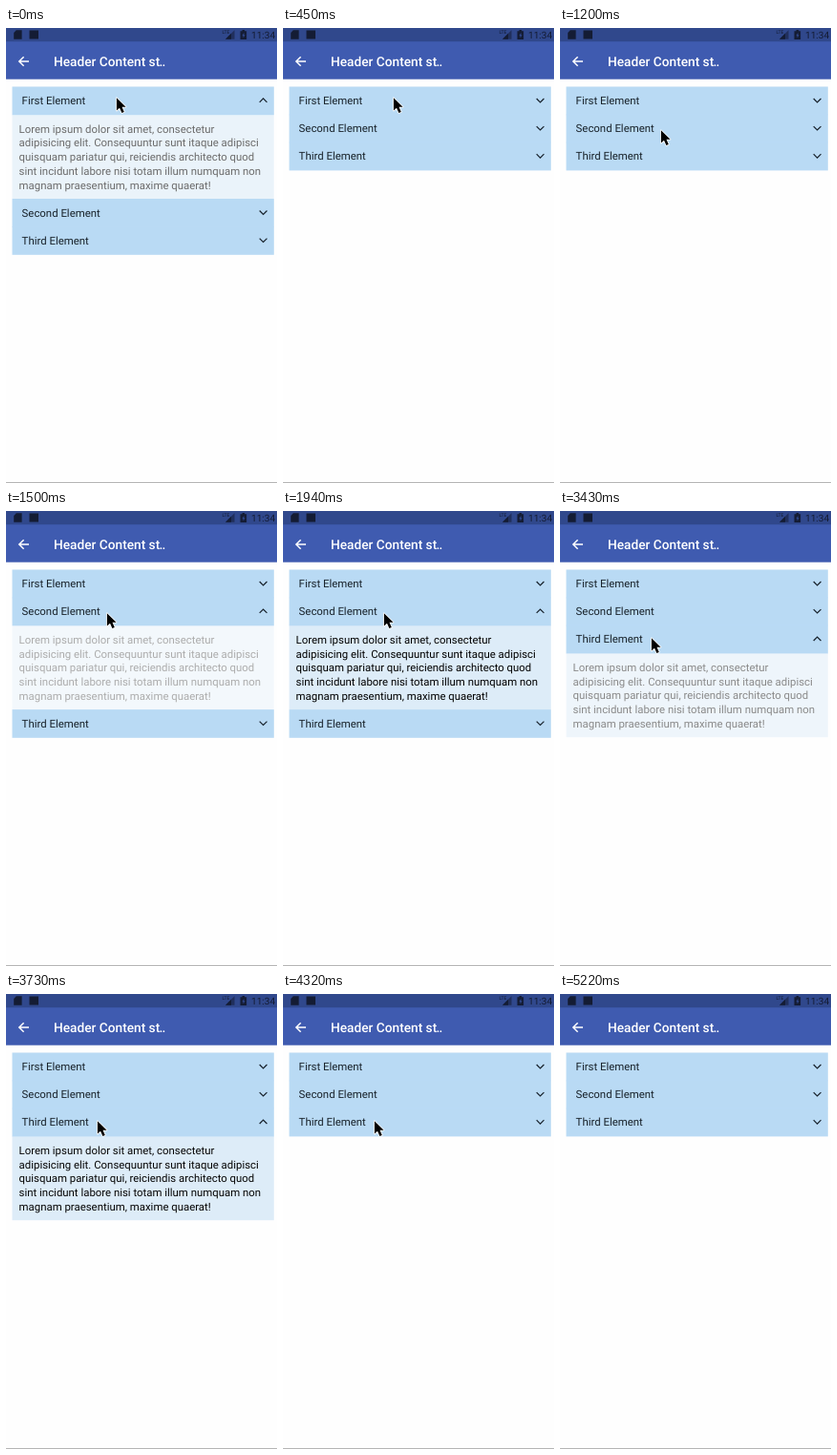
Write an HTML page that moves like this. It is 284x477 px and loops after 5970 ms.

```html
<!DOCTYPE html>
<html lang="en">
<head>
<meta charset="utf-8">
<title>Accordion</title>
<style>
  html, body { margin: 0; width: 100%; height: 100%; overflow: hidden; background: #fefefe; }
  svg { display: block; width: 284px; height: 477px; font-family: Roboto, "Open Sans", sans-serif; }
  text { text-rendering: geometricPrecision; white-space: pre; }
  .row text, .content text { font-size: 11.4px; }
  .row text { fill: #18222a; }
  .line { fill: none; }
</style>
</head>
<body>
<svg id="stage" viewBox="0 0 284 477">
  <rect width="284" height="477" fill="#fefefe"/>
  <rect y="476" width="284" height="1" fill="#b4b4b4"/>

  <rect width="284" height="53.7" fill="#3f5bb0"/>
  <rect width="284" height="14.2" fill="#30488c"/>
  <g fill="#141c34">
    <path d="M10.8 2.2H16.6V11.8H8.2V5Z"/>
    <rect x="24.5" y="2.5" width="9.5" height="9"/>
    <path d="M239.5 2.3V11.8H230Z" fill-opacity=".55"/>
    <path d="M236 5.8V11.8H230Z"/>
    <path d="M247.5 2h2.6v1.2h2V12h-6.6V3.2h2Z"/>
    <text x="226.5" y="6.4" font-size="5">LTE</text>
    <text x="257" y="10.6" font-size="10.1">11:34</text>
  </g>
  <path d="M249.4 4.8L247.4 8.2H248.6V10.6L250.6 7.2H249.4Z" fill="#30488c"/>

  <path class="line" d="M24 35H14M18.6 30.2L13.8 35L18.6 39.8" stroke="#fff" stroke-width="1.5"/>
  <g fill="#fff" font-size="13.7" font-weight="500">
    <text x="50" y="40.1">Header Content st</text>
    <text x="160.6" y="40.1" letter-spacing="-.9">..</text>
  </g>
</svg>
<script>
const LOOP = 5970, TICK = 148.9;
const TOP = 61.5, ROW = 29.1, OPEN = 88.4, LEFT = 6.5, WIDTH = 274.3;
const OVERLAP = .6; // hides seams between rows
const LINES = [
  'Lorem ipsum dolor sit amet, consectetur',
  'adipisicing elit. Consequuntur sunt itaque adipisci',
  'quisquam pariatur qui, reiciendis architecto quod',
  'sint incidunt labore nisi totam illum numquam non',
  'magnam praesentium, maxime quaerat!'
];
const ITEMS = [
  { title: 'First Element', opened: -215, closed: 440 },
  { title: 'Second Element', opened: 1440, closed: 2380 },
  { title: 'Third Element', opened: 3272, closed: 4315 }
];
const START = { x: 115, y: 72 };
const GLIDES = [
  { x: 105, y: 106, from: 738, ms: 340 },
  { x: 95, y: 132, from: 2655, ms: 222 },
  { x: 145, y: 251, from: 4630, ms: 230 },
  { x: 167, y: 253, from: 4917, ms: 140 }
];
const POINTER_GONE = 5200;

const stage = document.getElementById('stage');

function add(parent, tag, attrs, text) {
  const el = document.createElementNS('http://www.w3.org/2000/svg', tag);
  for (const name in attrs) el.setAttribute(name, attrs[name]);
  if (text) el.textContent = text;
  return parent.appendChild(el);
}

function move(el, x, y) {
  el.setAttribute('transform', `translate(${x} ${y})`);
}

function ease(x) {
  const c = Math.min(1, Math.max(0, x));
  return c * c * (3 - 2 * c);
}

for (const item of ITEMS) {
  item.content = add(stage, 'g', { class: 'content' });
  add(item.content, 'rect', { x: LEFT, width: WIDTH, height: OPEN, fill: '#ddecf8' });
  LINES.forEach((line, n) =>
    add(item.content, 'text', { x: 13.6, y: 19.2 + 14.7 * n }, line));

  item.row = add(stage, 'g', { class: 'row' });
  add(item.row, 'rect', { x: LEFT, width: WIDTH, height: ROW + OVERLAP, fill: '#b9daf4' });
  add(item.row, 'text', { x: 16.6, y: 18.8 }, item.title);
  const spot = add(item.row, 'g', { transform: 'translate(269.6 14.4)' });
  item.arrow = add(spot, 'path',
    { class: 'line', d: 'M-3.9 -1.9L0 2L3.9 -1.9', stroke: '#16202a', 'stroke-width': 1.2 });
}

const pointer = add(stage, 'path', {
  d: 'M.9 1.2V14.6L4 11.8L6.4 17L8.8 15.9L6.5 10.8H10.6Z',
  stroke: '#fff', 'stroke-width': 1.6, 'stroke-linejoin': 'round', 'paint-order': 'stroke'
});

function drawList(t) {
  let y = TOP;
  for (const { opened, closed, content, row, arrow } of ITEMS) {
    const open = t >= opened && t < closed;
    move(row, 0, y);
    arrow.setAttribute('transform', `scale(1 ${open ? -1 : 1})`);
    y += ROW;
    move(content, 0, y);
    content.setAttribute('opacity', open ? .3 + .7 * ease((t - opened) / 500) : 0);
    if (open) y += OPEN;
  }
}

function drawPointer(t) {
  let { x, y } = START;
  for (const glide of GLIDES) {
    const part = ease((t - glide.from) / glide.ms);
    x += (glide.x - x) * part;
    y += (glide.y - y) * part;
  }
  move(pointer, Math.round(x), Math.round(y));
  pointer.setAttribute('opacity', t < POINTER_GONE ? 1 : 0);
}

// The picture refreshes once per tick.
function frame() {
  const t = Math.floor((performance.now() - began) % LOOP / TICK) * TICK;
  drawList(t);
  drawPointer(t);
  requestAnimationFrame(frame);
}

const began = performance.now();
frame();
</script>
</body>
</html>
```
